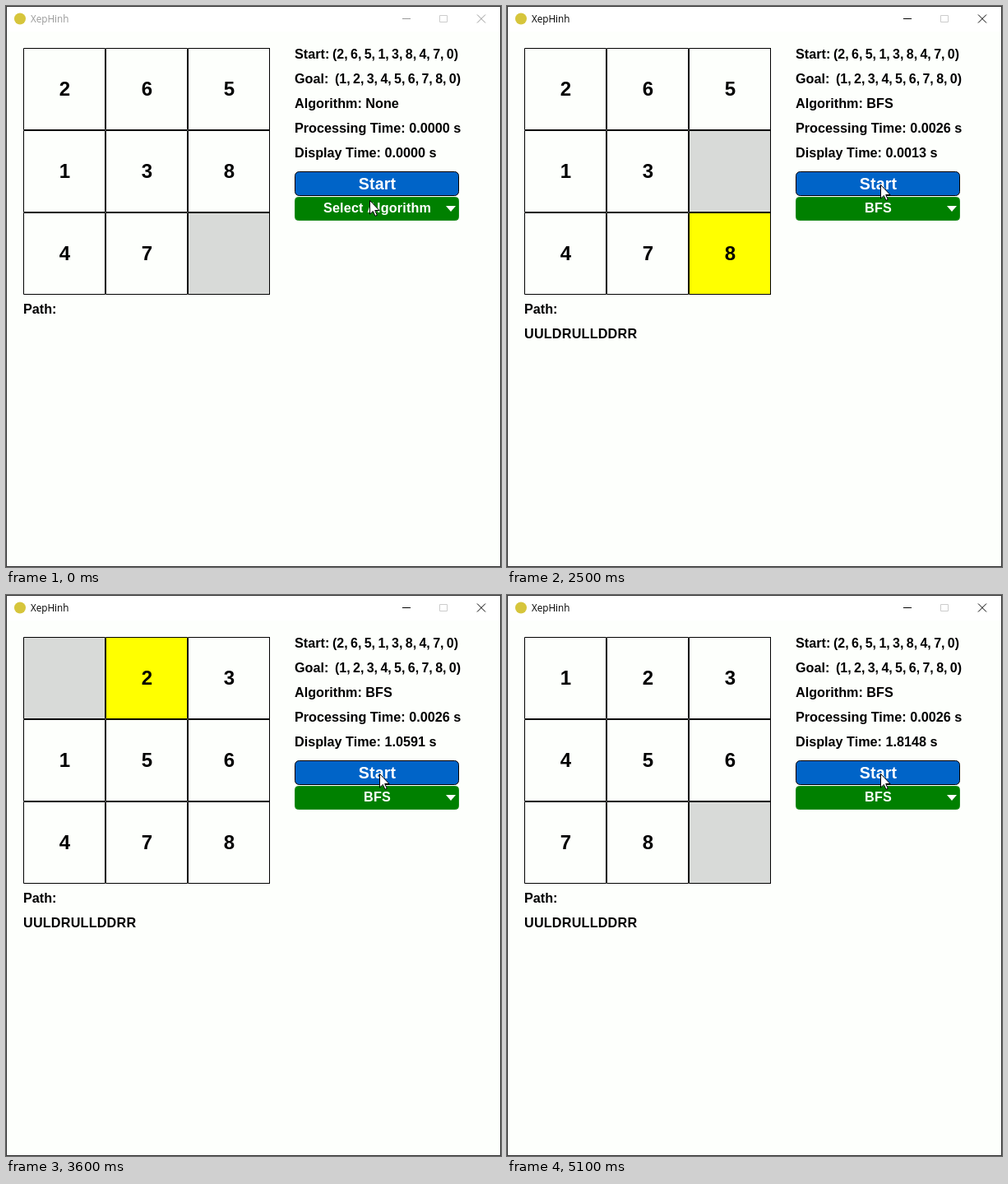
Recreate the animation shown at these times as an HTML page with a canvas. Size 602 by 682 pixels, loop 5200 ms.

```html
<!DOCTYPE html>
<html lang="en">
<head>
<meta charset="utf-8">
<title>XepHinh</title>
<style>
html, body { margin: 0; width: 100%; height: 100%; overflow: hidden; background: #fdfffc; }
canvas { display: block; }
</style>
</head>
<body>
<canvas id="c" width="602" height="682"></canvas>
<script>
const g = document.getElementById('c').getContext('2d');
const LOOP = 5200, STEP = 100;
const BOLD = '"Liberation Sans", Arial, sans-serif';
const START = [2, 6, 5, 1, 3, 8, 4, 7, 0], GOAL = [1, 2, 3, 4, 5, 6, 7, 8, 0];
const PATH = 'UULDRULLDDRR', SHIFT = { U: -3, D: 3, L: -1, R: 1 };
const SOLVE_AT = 2480;
const CLOCK = [.0013, .1525, .3036, .4546, .6055, .7565, .9078, 1.0591, 1.2104, 1.3617, 1.5127, 1.6638, 1.8148];
const OPTIONS = ['BFS', 'DFS', 'UCS', 'IDS', 'Greedy', 'A*', 'IDA*', 'Simple HC', 'Steepest HC',
  'Stochastic HC', 'Annealing', 'Beam Search', 'Genetic'];
// time, x, y of the pointer tip
const POINTER = [[0, 442, 236], [600, 445, 243], [1100, 445, 243], [1300, 442, 249],
  [1500, 427, 271], [1800, 427, 271], [2100, 454, 217], [LOOP, 454, 217]];
const ARROW = new Path2D('M0 0V16.5L3.8 13L6.5 18.8L8.8 17.8L6.2 12H11.5Z');

function text(s, x, y, { size = 16.2, color = '#000', align = 'left', words = 0, letters = 0 } = {}) {
  g.font = `bold ${size}px ${BOLD}`;
  g.fillStyle = color;
  g.textAlign = align;
  g.wordSpacing = words + 'px';
  g.letterSpacing = letters + 'px';
  g.fillText(s, x, y);
}

function box(x, y, w, h, fill, stroke, radius = 0) {
  g.beginPath();
  g.roundRect(x + .5, y + .5, w - 1, h - 1, radius);
  g.fillStyle = fill;
  g.fill();
  g.strokeStyle = stroke;
  g.lineWidth = 1;
  g.stroke();
}

function lines(color, ...points) {
  g.strokeStyle = color;
  g.lineWidth = 1;
  g.beginPath();
  for (const [x1, y1, x2, y2] of points) {
    g.moveTo(x1, y1);
    g.lineTo(x2, y2);
  }
  g.stroke();
}

function drawWindow(active) {
  box(0, 0, 602, 682, '#fdfffc', '#303030');
  g.fillStyle = '#fff';
  g.fillRect(1, 1, 600, 30);
  g.fillStyle = '#d6c53c';
  g.beginPath();
  g.arc(17, 15.5, 7, 0, 7);
  g.fill();
  const ink = active ? '#000' : '#999';
  g.font = '11.7px "Open Sans", "Noto Sans", sans-serif';
  g.textAlign = 'left';
  g.letterSpacing = g.wordSpacing = '0px';
  g.fillStyle = ink;
  g.fillText('XepHinh', 30, 20);
  lines(ink, [482, 15.5, 492, 15.5], [573, 10.5, 583, 20.5], [583, 10.5, 573, 20.5]);
  box(527, 11, 10, 9, '#fff', '#ccc');
}

function drawBoard(moves) {
  const board = [...START];
  let blank = 8, moved = -1;
  for (const m of PATH.slice(0, moves)) {
    moved = blank;
    blank += SHIFT[m];
    board[moved] = board[blank];
    board[blank] = 0;
  }
  if (moves > PATH.length) moved = -1;
  board.forEach((n, i) => {
    const x = 21 + i % 3 * 100, y = 51 + Math.floor(i / 3) * 100;
    box(x, y, 100, 100, !n ? '#d8dad8' : i === moved ? '#ff0' : '#fdfffc', '#000');
    if (n) text(n, x + 50.5, y + 58, { size: 24, align: 'center' });
  });
  lines('#000', [321 - .5, 51, 320.5, 351]);
}

function drawPanel(t, moves) {
  const chosen = t >= 1800, solved = moves > 0;
  const tuple = a => `(${a.join(', ')})`;
  text('Start:', 351, 64);
  text(tuple(START), 397, 64, { size: 16, words: -1.1 });
  text('Goal:', 351, 94);
  text(tuple(GOAL), 400, 94, { size: 16, words: -1.1 });
  text('Algorithm: ' + (chosen ? 'BFS' : 'None'), 351, 124);
  text(`Processing Time: ${solved ? '0.0026' : '0.0000'} s`, 351, 154);
  text(`Display Time: ${(solved ? CLOCK[moves - 1] : 0).toFixed(4)} s`, 351, 184);
  text('Path:', 21, 374);
  if (solved) text(PATH, 21, 404, { letters: .2 });

  const label = { color: '#fff', align: 'center', letters: .15 };
  box(351, 201, 200, 30, '#0064c8', '#000', 5);
  text('Start', 451.5, 223, { ...label, size: 19.6 });
  box(351, 232, 200, 29, '#008000', '#1c8c1c', 4);
  text(chosen ? 'BFS' : 'Select Algorithm', 451.5, 251, label);
  g.beginPath();
  g.moveTo(535, 243);
  g.lineTo(547, 243);
  g.lineTo(541, 250);
  g.fill();

  if (t >= 1200 && !chosen) OPTIONS.forEach((name, i) => {
    g.fillStyle = '#008000';
    g.fillRect(351, 261 + i * 30, 200, 30);
    text(name, 451.5, 281 + i * 30, label);
  });
}

function drawPointer(t) {
  const i = POINTER.findIndex(p => p[0] > t);
  const [t0, x0, y0] = POINTER[i - 1], [t1, x1, y1] = POINTER[i];
  const k = (t - t0) / (t1 - t0);
  g.save();
  g.translate(Math.round(x0 + (x1 - x0) * k) + .5, Math.round(y0 + (y1 - y0) * k) + .5);
  g.fillStyle = '#fff';
  g.fill(ARROW);
  g.strokeStyle = '#000';
  g.lineWidth = 1;
  g.stroke(ARROW);
  g.restore();
}

const begin = performance.now();
function frame() {
  const t = Math.floor((performance.now() - begin) % LOOP / STEP) * STEP;
  const moves = Math.max(0, Math.min(CLOCK.length, Math.floor((t - SOLVE_AT) / 151.2) + 1));
  drawWindow(t >= 300);
  drawBoard(moves);
  drawPanel(t, moves);
  drawPointer(t);
  requestAnimationFrame(frame);
}
frame();
</script>
</body>
</html>
```
